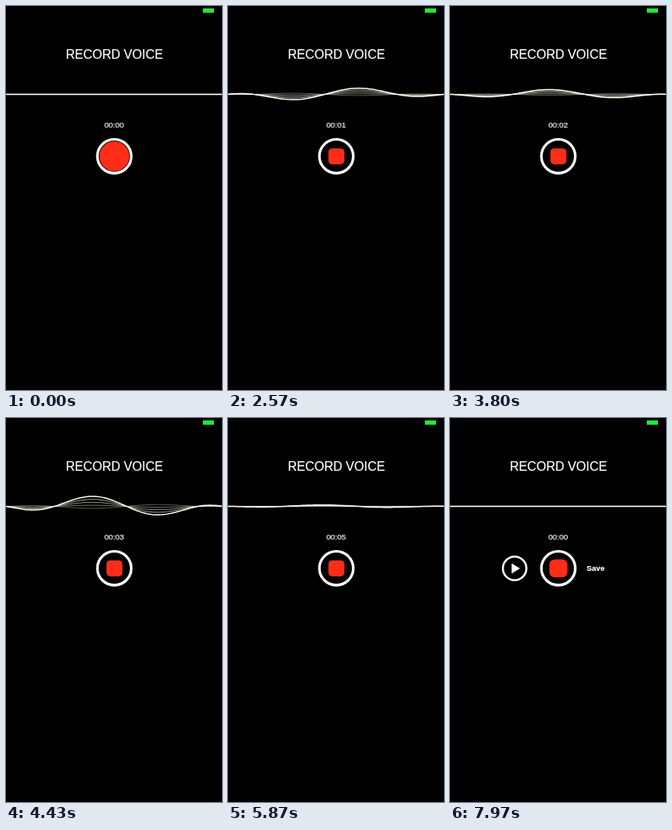
These frames come from a looping animation (270x480 px, 8000 ms). An HTML page:

```html
<!DOCTYPE html>
<html lang="en">
<head>
<meta charset="utf-8">
<title>Voice recorder</title>
<style>
  html, body { margin: 0; width: 100%; height: 100%; overflow: hidden; background: #000; }
  svg { display: block; width: 100%; height: 100%; }
  text {
    font-family: "Liberation Sans", Arial, sans-serif;
    fill: #fffffa; stroke: #fffffa; stroke-width: 0.2; text-anchor: middle;
  }
</style>
</head>
<body>
<svg viewBox="0 0 270 480">
  <rect width="270" height="480" fill="#000"/>
  <rect x="246" y="3" width="14" height="5.5" fill="#22e63c"/>
  <text x="135.5" y="66" font-size="15.75">RECORD VOICE</text>
  <g id="waves" fill="none" stroke="#fffff0"></g>
  <text id="clock" x="135.2" y="152.3" font-size="9.8">00:00</text>
  <circle cx="135.4" cy="187.8" r="21.2" fill="none" stroke="#fffffa" stroke-width="3.3"/>
  <rect id="dot" fill="#ff2d18"/>
  <g id="review">
    <circle cx="80.8" cy="188" r="14.7" fill="none" stroke="#fffffa" stroke-width="2.5"/>
    <path d="M77 181.8V194.4L87.6 188.1Z" fill="#fffffa"/>
    <text x="182" y="191.4" font-size="9.7" font-weight="bold" stroke-width="0">Save</text>
  </g>
</svg>
<script>
const LOOP = 8, START = 0.84, STOP = 7.9, MORPH = 0.3;
const WIDTH = 270, MID = WIDTH / 2, LINE_Y = 110.4, PERIOD = 180, SPEED = 257.8;
const CIRCLE = { size: 37.4, radius: 18.7 }, SQUARE = { size: 20, radius: 4.6 };
const $ = id => document.getElementById(id);

// [seconds, wave height in px]
const LEVELS = [
  [0, 0], [0.85, 0], [1.63, 1.7], [2.1, 5], [2.57, 8], [3.2, 9],
  [3.8, 6], [4.43, 13], [5, 9], [5.87, 1.7], [6.6, 4], [7.4, 2], [7.9, 0], [8, 0]
];

const waves = Array.from({ length: 5 }, (_, i) => {
  const path = document.createElementNS("http://www.w3.org/2000/svg", "path");
  const progress = 1 - i / 5;
  path.setAttribute("stroke-width", i ? 0.72 : 1.5);
  path.setAttribute("stroke-opacity", Math.min(1, (progress * 2 + 1) / 3));
  $("waves").append(path);
  return { path, gain: 1.5 * progress - 0.5 };
});

const clamp = v => Math.max(0, Math.min(1, v));
const smooth = v => v * v * (3 - 2 * v);
const mix = (a, b, k) => a + (b - a) * k;

function level(t) {
  const i = LEVELS.findIndex(([at], n) => n && t <= at);
  const [t0, a] = LEVELS[i - 1], [t1, b] = LEVELS[i];
  return mix(a, b, smooth((t - t0) / (t1 - t0)));
}

function wavePath(height, phase) {
  let d = "";
  for (let x = 0; x <= WIDTH; x += 3) {
    const taper = 1 - ((x - MID) / MID) ** 2;
    const y = LINE_Y + taper * height * Math.sin(2 * Math.PI * x / PERIOD + phase);
    d += (x ? "L" : "M") + x + " " + y.toFixed(2);
  }
  return d;
}

function setDot(square) {
  const size = mix(CIRCLE.size, SQUARE.size, square);
  const rx = mix(CIRCLE.radius, SQUARE.radius, square);
  const attrs = { x: 135.5 - size / 2, y: 187.9 - size / 2, width: size, height: size, rx };
  for (const name in attrs) $("dot").setAttribute(name, attrs[name]);
}

function render(t) {
  const phase = -2 * Math.PI * (168 + SPEED * (t - 3.8)) / PERIOD;
  const height = level(t);
  for (const { path, gain } of waves) path.setAttribute("d", wavePath(height * gain, phase));

  const stopped = t >= STOP;
  const seconds = stopped ? 0 : Math.max(0, Math.floor(t - START));
  $("clock").textContent = "00:" + String(seconds).padStart(2, "0");
  $("review").setAttribute("visibility", stopped ? "visible" : "hidden");
  setDot(smooth(clamp((t - START + 0.04) / MORPH)) - smooth(clamp((t - STOP) / MORPH)));
}

const begin = performance.now();
function tick() {
  render((performance.now() - begin) / 1000 % LOOP);
  requestAnimationFrame(tick);
}
tick();
</script>
</body>
</html>
```
